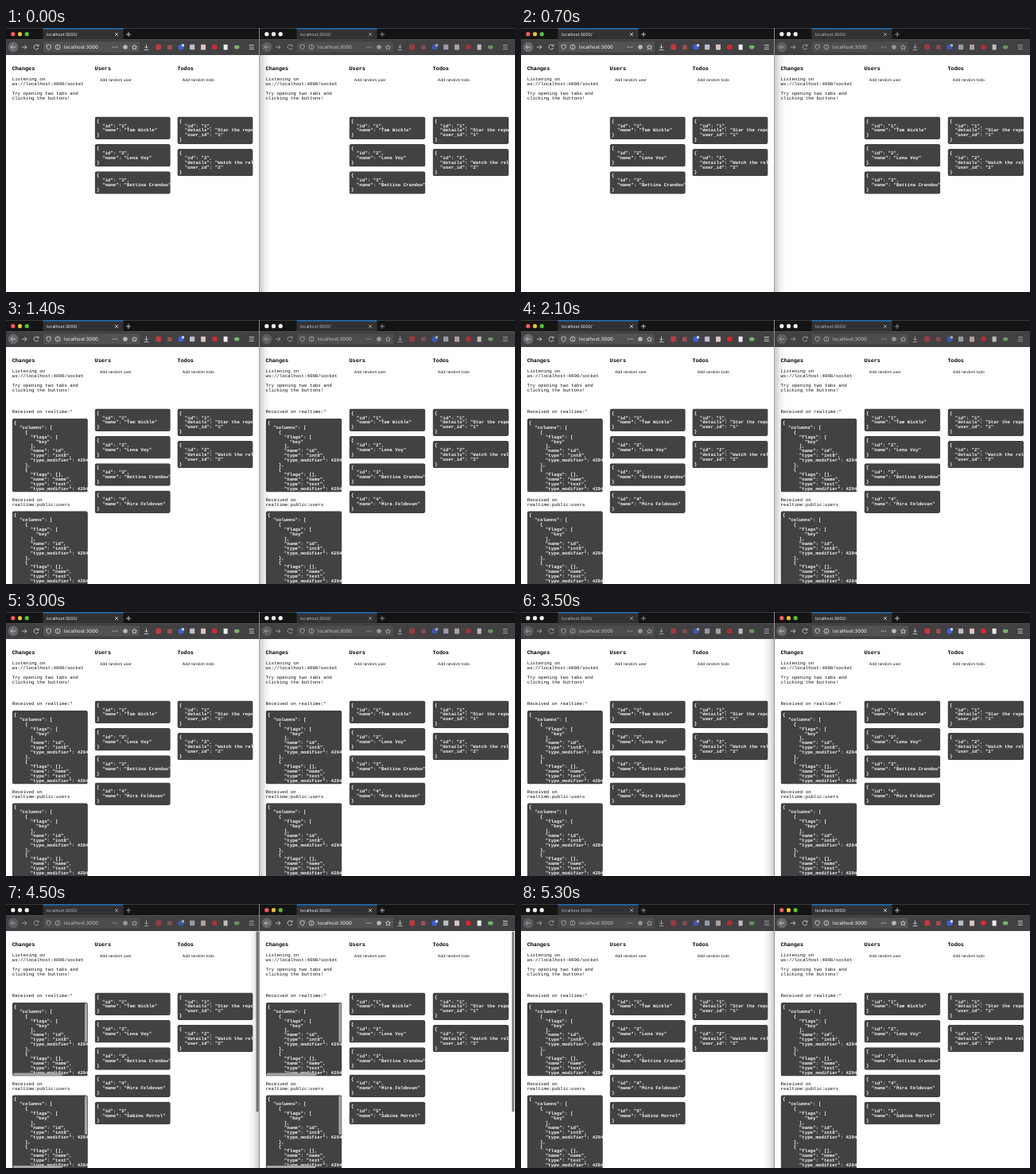
An HTML page that plays this animation: 640 by 332 pixels, repeating every 5400 ms.

```html
<!DOCTYPE html>
<html lang="en">
<head>
<meta charset="utf-8">
<title>Realtime tabs</title>
<style>
  html, body { margin: 0; width: 100%; height: 100%; overflow: hidden; background: #fff; }
  svg { display: block; width: 100vw; height: 100vh; }
  text { white-space: pre; text-rendering: geometricPrecision; }
  .mono { font: 5.78px "Liberation Mono", monospace; fill: #111; }
  .head { font: bold 6.8px "Liberation Mono", monospace; fill: #000; }
  .code { font: bold 5.78px "Liberation Mono", monospace; fill: #f4f4f4; }
  .ui { font-family: Inter, sans-serif; }
  .line { fill: none; stroke: #cfcfd0; stroke-width: .9; }
</style>
</head>
<body>
<svg id="stage" viewBox="0 0 640 332" preserveAspectRatio="none">
  <defs>
    <linearGradient id="shade">
      <stop offset="0" stop-color="#000" stop-opacity=".2"/>
      <stop offset=".5" stop-color="#000" stop-opacity=".06"/>
      <stop offset="1" stop-color="#000" stop-opacity="0"/>
    </linearGradient>
  </defs>
</svg>
<script>
const LOOP = 5400, STEP = 100, LEADING = 5.93;
const FIRST_INSERT = 800, FOCUS_SWITCH = 3300, SECOND_INSERT = 4400;
const LIGHTS = ['#fc5b57', '#e5bf3c', '#57c038'];
const stage = document.getElementById('stage');

function add(parent, tag, attrs = {}, content) {
  const node = document.createElementNS('http://www.w3.org/2000/svg', tag);
  for (const key in attrs) node.setAttribute(key, attrs[key]);
  if (content !== undefined) node.textContent = content;
  parent.append(node);
  return node;
}
const group = (parent, attrs) => add(parent, 'g', attrs);
const rect = (parent, x, y, width, height, fill, rx = 0) =>
  add(parent, 'rect', { x, y, width, height, fill, rx });
const circle = (parent, cx, cy, r, fill) => add(parent, 'circle', { cx, cy, r, fill });
const line = (parent, d) => add(parent, 'path', { d, class: 'line' });
const label = (parent, x, y, text, size, fill) =>
  add(parent, 'text', { x, y, class: 'ui', 'font-size': size, fill }, text);

function lines(parent, x, y, rows, cls) {
  rows.forEach((row, i) => add(parent, 'text', { x, y: y + i * LEADING, class: cls }, row));
}

let clipCount = 0;
function card(parent, x, y, width, rows, height = rows.length * LEADING + 4.8) {
  const id = 'clip' + clipCount++;
  rect(add(parent, 'clipPath', { id }), x, y, width, height, '#000', 2.5);
  const box = group(parent, { 'clip-path': `url(#${id})` });
  rect(box, x, y, width, height, '#424242', 2.5);
  lines(box, x + 2.4, y + 7, rows, 'code');
  return box;
}

const json = fields => ['{', ...fields.map(([key, value], i) =>
  `  "${key}": "${value}"${i < fields.length - 1 ? ',' : ''}`), '}'];

const column = (flags, name, type) => [
  '    {', ...flags, `      "name": "${name}",`, `      "type": "${type}",`,
  '      "type_modifier": 4294967295', '    },'];

const payload = ['{', '  "columns": [',
  ...column(['      "flags": [', '        "key"', '      ],'], 'id', 'int8'),
  ...column(['      "flags": [],'], 'name', 'text')];

const users = ['Tam Wickle', 'Lena Voy', 'Bettina Crandow', 'Mira Feldovan', 'Sabina Morrel'];
const todos = ['Star the repo"', 'Watch the releases'];

function extensions(bar) {
  rect(bar, 188.3, 20.6, 6.8, 6.8, '#bd3a3d', 1.6);
  rect(bar, 203, 21.4, 5.6, 5.6, '#9c5154', .8);
  circle(bar, 220, 24, 3.6, '#3d5fd8');
  rect(bar, 221, 20.3, 3, 3, '#d6dcef', .6);
  rect(bar, 231, 20.8, 6.2, 6.4, '#bcbccb', .6);
  rect(bar, 245, 20.8, 6, 6.6, '#dcc3c3', .6);
  circle(bar, 262.3, 24, 3.3, '#d22b31');
  rect(bar, 273.6, 20.8, 5, 6.6, '#ececec', .5);
  rect(bar, 286.8, 21.8, 6.8, 4.6, '#74b568', 2.3);
}

function toolbar(win, width) {
  rect(win, 0, 0, width, 14.5, '#141415');
  rect(win, 0, 0, width, .7, '#4c4c4e');
  rect(win, 46.5, 0, 101, 14.5, '#323235');
  rect(win, 46.5, .3, 101, 1.2, '#1583e0');
  rect(win, 0, 14.2, width, 19.8, '#414143');
  const lights = [8.8, 17.5, 26.2].map(x => circle(win, x, 7.7, 2.6, '#fff'));

  const bar = group(win);
  label(bar, 51, 9.9, 'localhost:3000/', 5.2, '#f5f5f5');
  line(bar, 'M137 6l4 4m0-4l-4 4M151 8h6m-3-3v6');
  circle(bar, 9, 24, 6.4, '#69696b');
  line(bar, 'M12 24h-6m2.6-2.6L6 24l2.6 2.6M20 24h6m-2.6-2.6L26 24l-2.6 2.6');
  line(bar, 'M40.6 22.3a3 3 0 1 0 .3 2.7M41 20.6v2.2h-2.2');
  rect(bar, 47, 17.2, 121, 13.3, '#525254', 1.3);
  line(bar, 'M53.6 20.9l2.8 1q0 4-2.8 5.5q-2.8-1.5-2.8-5.5z');
  line(bar, 'M68 24a3 3 0 1 1-6 0a3 3 0 1 1 6 0M65 23.5v2.2M65 22v.7');
  label(bar, 73, 26.2, 'localhost:3000', 6.05, '#f5f5f5');
  [134.5, 137, 139.5].forEach(x => circle(bar, x, 24, .7, '#d0d0d2'));
  circle(bar, 150, 24, 2.8, '#b9b9bb');
  line(bar, 'M161.5 21l1 2.1 2.2.2-1.7 1.5.5 2.2-2-1.2-2 1.2.5-2.2-1.7-1.5 2.2-.2z');
  line(bar, 'M176.5 20.5v5m-2.2-2l2.2 2.2 2.2-2.2M173.5 27.6h6');
  extensions(bar);
  line(bar, 'M305.8 21.5h6M305.8 24h6M305.8 26.5h6');
  return { lights, bar };
}

function browser(x, width, cols, cardWidth) {
  const win = group(stage, { transform: `translate(${x} 0)` });
  rect(win, 0, 0, width, 332, '#fff');
  const [left, middle, right] = cols;
  ['Changes', 'Users', 'Todos'].forEach((text, i) =>
    add(win, 'text', { x: cols[i], y: 53, class: 'head' }, text));
  lines(win, left, 66, ['Listening on', 'ws://localhost:4000/socket', '',
    'Try opening two tabs and', 'clicking the buttons!'], 'mono');

  [[middle, 'user'], [right, 'todo']].forEach(([bx, kind]) => {
    rect(win, bx + 2, 69.6, 49, .5, '#ececec');
    label(win, bx + 6.3, 67, 'Add random ' + kind, 4.9, '#1a1a1a');
  });

  const userCards = users.map((name, i) =>
    card(win, middle, 111.6 + i * 34.3, cardWidth, json([['id', i + 1], ['name', name]])));
  todos.forEach((details, i) => card(win, right, 111.6 + i * 40.3, cardWidth,
    json([['id', i + 1], ['details', details], ['user_id', i + 1]])));

  const changes = group(win);
  lines(changes, left, 116.8, ['Received on realtime:*'], 'mono');
  lines(changes, left, 227.6, ['Received on', 'realtime:public:users'], 'mono');
  const bars = [123.8, 240.2].map(top => {
    const box = card(changes, left, top, cardWidth, payload, 92.8);
    const thumbs = group(box);
    rect(thumbs, left + cardWidth - 4, top + 1, 3.2, 49, '#a5a5a5', 1.6);
    rect(thumbs, left + 1, top + 88.8, 62, 3.2, '#a5a5a5', 1.6);
    return thumbs;
  });
  const pageBar = rect(win, width - 4, 34.5, 3.2, 227, '#858585', 1.6);
  return { userCards, changes, bars, pageBar, ...toolbar(win, width) };
}

const windows = [
  browser(0, 318.5, [7.7, 111.6, 215.4], 95.2),
  browser(319, 321, [7.6, 112.5, 217.5], 95.8)
];
rect(stage, 318.2, 0, .8, 332, '#8b8b8b');
const shadows = [
  rect(stage, 319, 34, 14, 298, 'url(#shade)'),
  rect(stage, 0, 34, 14, 298, 'url(#shade)')
];
shadows[1].setAttribute('transform', 'translate(318.5 0) scale(-1 1)');

// Overlay scrollbars stay solid until `end`, then fade out.
const fade = (t, start, end) =>
  t < start ? 0 : t < end ? 1 : Math.max(0, .5 - (t - end) / 200);
const show = (node, visible) => { node.style.opacity = Number(visible); };

function render(t) {
  const active = t < FOCUS_SWITCH ? 0 : 1;
  const count = t < FIRST_INSERT ? 3 : t < SECOND_INSERT ? 4 : 5;
  const pageFade = fade(t, SECOND_INSERT, 5000);
  const thumbFade = t < SECOND_INSERT ? fade(t, FIRST_INSERT, 1300) : pageFade;
  windows.forEach((win, i) => {
    const focused = i === active;
    win.lights.forEach((light, k) => light.setAttribute('fill', focused ? LIGHTS[k] : '#f2f2f2'));
    show(win.bar, focused ? 1 : .72);
    show(win.changes, t >= FIRST_INSERT);
    win.userCards.forEach((box, k) => show(box, k < count));
    win.bars.forEach(bar => show(bar, thumbFade));
    show(win.pageBar, pageFade);
    show(shadows[i], focused);
  });
}

const start = performance.now();
function tick(now) {
  const t = Math.max(0, now - start) % LOOP;
  render(Math.floor(t / STEP) * STEP);
  requestAnimationFrame(tick);
}
render(0);
requestAnimationFrame(tick);
</script>
</body>
</html>
```
